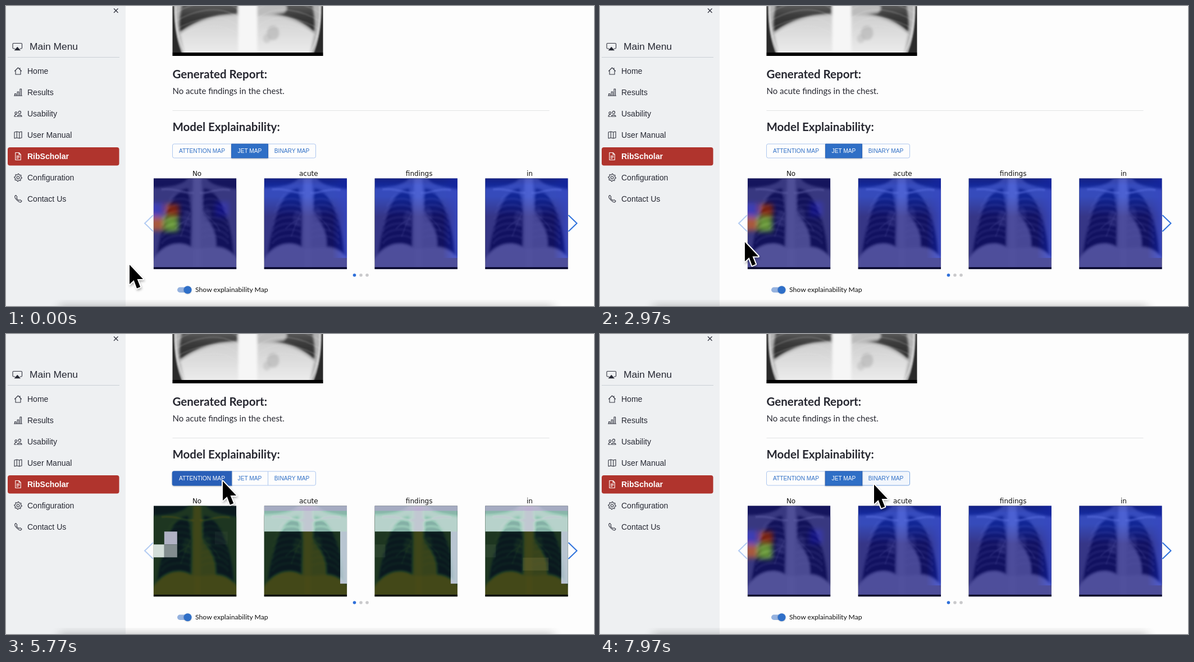
These frames come from a looping animation (1047x535 px, 8000 ms). An HTML page:

```html
<!DOCTYPE html>
<html lang="en">
<head>
<meta charset="utf-8">
<title>Chest report viewer</title>
<style>
  html, body { margin: 0; width: 100%; height: 100%; overflow: hidden; background: #fdfdfd; }
  svg { display: block; width: 1047px; height: 535px; }
  .menu { font: 14px "Liberation Sans", Arial, sans-serif; fill: #262833; }
  .menu .head { font-size: 17.4px; }
  .menu .on { font-weight: 700; fill: #fff; }
  .icon { fill: none; stroke: #31333f; stroke-width: 1.1; stroke-linejoin: round; stroke-linecap: round; }
  .title { font: 700 20.5px Lato, "Open Sans", sans-serif; fill: #262730; }
  .body { font: 15px Lato, "Open Sans", sans-serif; fill: #262730; }
  .switch { font: 12.2px Lato, "Open Sans", sans-serif; fill: #111; }
  .word { font: 12px "DejaVu Sans", sans-serif; fill: #111; text-anchor: middle; }
  .tab { font: 10.2px "Liberation Sans", Arial, sans-serif; text-anchor: middle; }
</style>
</head>
<body>
<svg id="stage" viewBox="0 0 1047 535" xmlns="http://www.w3.org/2000/svg"></svg>
<script>
const stage = document.getElementById('stage');
const LOOP = 8000, PICK_ATTENTION = 4930, PICK_JET = 7080, FADE = 250;
const W = 147.5, H = 162;
const range = n => [...Array(n).keys()];
const line = (d, extra = '') => `<path d="${d}" ${extra}/>`;
const box = (x, y, w, h, fill, extra = '') =>
  `<rect x="${x}" y="${y}" width="${w}" height="${h}" fill="${fill}" ${extra}/>`;

// Sidebar
const icons = [
  'M-6 0 L0 -6 L6 0 M-4.5 -1.5 V6 H4.5 V-1.5 M3.4 -5.5 V-3',
  'M-6 6 V2.5 H-3.5 V6 Z M-1.3 6 V-1 H1.3 V6 Z M3.5 6 V-6 H6 V6 Z M-7 6 H7',
  'M-1.2 5 C-1.2 1.5 6.6 1.5 6.6 5 Z M-3 5 H-6.6 C-6.6 2.6 -5 1.4 -3 1.5 M5 -2.3 A2.3 2.3 0 1 1 .4 -2.3 A2.3 2.3 0 1 1 5 -2.3 M-1.8 -1.2 A1.9 1.9 0 1 1 -5.6 -1.2 A1.9 1.9 0 1 1 -1.8 -1.2',
  'M-6.5 -5 L-2.2 -6 L2.2 -5 L6.5 -6 V5 L2.2 6 L-2.2 5 L-6.5 6 Z M-2.2 -6 V5 M2.2 -5 V6',
  'M-4.7 -6.5 H1.5 L4.7 -3.3 V6.5 H-4.7 Z M1.5 -6.5 V-3.3 H4.7 M-2.3 -.8 H2.3 M-2.3 1.4 H2.3 M-2.3 3.6 H.5',
  '',
  'M-5.5 -5.2 L-3.8 -6.5 L-1.6 -3.5 L-2.6 -1.9 C-2 .2 -.2 2 1.9 2.6 L3.5 1.6 L6.5 3.8 L5.2 5.5 C2.5 8 -7.5 -1.5 -5.5 -5.2 Z'
];
const gear = 'M' + range(32).map(i => {
  const a = i * Math.PI / 16, r = i % 4 < 2 ? 6.7 : 5.1;
  return `${(r * Math.cos(a)).toFixed(1)} ${(r * Math.sin(a)).toFixed(1)}`;
}).join('L') + 'Z M2.3 0 A2.3 2.3 0 1 1 -2.3 0 A2.3 2.3 0 1 1 2.3 0';
icons[5] = gear;

const items = ['Home', 'Results', 'Usability', 'User Manual', 'RibScholar', 'Configuration', 'Contact Us'];
const sidebar = `<g class="menu">
  ${box(0, 0, 213, 535, '#eef0f2')}
  ${line('M192 4.5 l7.5 7.5 m0 -7.5 l-7.5 7.5', 'stroke="#31333f" stroke-width="1.3"')}
  ${line('M16 76 H13.5 Q12 76 12 74.5 V68 Q12 66.5 13.5 66.5 H27 Q28.5 66.5 28.5 68 V74.5 Q28.5 76 27 76 H25', 'class="icon"')}
  ${line('M20.3 72.8 L26 79.3 H14.6 Z')}
  <text class="head" x="42" y="78.4">Main Menu</text>
  ${box(3, 91, 199, 1, '#c9d0d5')}
  ${box(3, 252, 198.5, 32.5, '#b0342d', 'rx="4"')}
  ${items.map((name, i) => {
    const y = 116 + 38 * i, on = i === 4;
    return line(icons[i], `class="icon" transform="translate(21.5 ${y})" ${on ? 'style="stroke:#fff"' : ''}`) +
      `<text x="38" y="${y + 5.2}" ${on ? 'class="on"' : ''}>${name}</text>`;
  }).join('')}
</g>`;

// Chest picture in grey, tinted later for each kind of map
const ribs = range(8).map(i => {
  const y = 32 + i * 11, out = 14 + 14 * Math.exp(-i / 1.6);
  return `M66 ${y - 2} C52 ${y - 10} ${out + 8} ${y - 8} ${out} ${y + 8}` +
    `M84 ${y - 2} C98 ${y - 10} ${W - out - 8} ${y - 8} ${W - out} ${y + 8}`;
}).join('');
const chest = `<g id="chest">
  ${box(0, 0, W, H, '#2c2c2c')}
  <g filter="url(#soft2)">
    ${line('M-5 17 C28 16 56 13 64 -5 H92 C98 13 122 15 153 20 V170 H-5 Z', 'fill="#767676"')}
    ${line('M62 18 C43 17 29 40 20 70 C13 95 8 118 6 140 C22 119 50 110 70 124 L68 62 Z', 'fill="#252525"')}
    ${line('M89 18 C106 17 121 36 130 66 C138 92 142 112 143 138 C130 122 112 118 90 123 L86 60 Z', 'fill="#252525"')}
    ${line('M70 0 H85 L88 60 C98 78 113 91 111 124 L67 128 L68 66 Z', 'fill="#9c9c9c"')}
    ${line('M-5 154 C10 118 46 108 68 124 C90 130 128 108 153 150 V170 H-5 Z', 'fill="#aaa"')}
    ${line('M72 0 H84 V160 H72 Z', 'fill="#bbb" opacity=".3"')}
    <ellipse cx="94" cy="66" rx="8" ry="14" fill="#888" opacity=".4"/>
    <ellipse cx="60" cy="72" rx="8" ry="14" fill="#888" opacity=".4"/>
  </g>
  <g fill="none" filter="url(#soft1)">
    ${line(ribs, 'stroke="#aaa" stroke-width="4.5" opacity=".17"')}
    ${line('M72 26 C54 27 38 17 14 20 M82 26 C100 27 112 17 136 21', 'stroke="#ccc" stroke-width="4" opacity=".4"')}
    ${line('M66 62 C56 78 54 90 48 104 M64 72 C54 76 44 84 38 90 M90 62 C102 74 112 80 118 94', 'stroke="#aaa" stroke-width="2" opacity=".3"')}
  </g>
</g>`;
const floor = fill => box(0, H - 3.5, W, 3.5, fill);

const table = (id, r, g, b) => `<filter id="${id}" x="0" y="0" width="1" height="1" color-interpolation-filters="sRGB">
  <feComponentTransfer><feFuncR type="table" tableValues="${r}"/><feFuncG type="table" tableValues="${g}"/>
  <feFuncB type="table" tableValues="${b}"/></feComponentTransfer></filter>`;
const blur = (id, s) => `<filter id="${id}" x="-50%" y="-50%" width="200%" height="200%"><feGaussianBlur stdDeviation="${s}"/></filter>`;

const defs = `<defs>
  ${blur('soft1', .8)}${blur('soft2', 2)}${blur('soft5', 5)}${blur('soft9', 9)}
  ${table('dim', '.03 .05 .13 .33 .4', '.05 .13 .23 .31 .36', '.1 .13 .13 .08 .1')}
  ${table('lit', '.4 .6 .74 .77 .8', '.55 .79 .83 .75 .8', '.55 .72 .81 .83 .88')}
  <clipPath id="frame">${box(0, 0, W, H, '#000')}</clipPath>
  <clipPath id="scan">${box(0, 0, 268, 89, '#000')}</clipPath>
  <clipPath id="hot"><path d="M0 0 H${W} V139 H135.5 V46 H0 Z"/></clipPath>
  <linearGradient id="top" x2="0" y2="1"><stop stop-color="#0018d0"/><stop offset=".08" stop-color="#0028fa"/>
    <stop offset=".2" stop-color="#0028f4"/>
    <stop offset=".42" stop-color="#000096"/><stop offset="1" stop-color="#00008c"/></linearGradient>
  <linearGradient id="side"><stop offset=".82" stop-color="#0020ff" stop-opacity="0"/>
    <stop offset="1" stop-color="#0020ff" stop-opacity=".9"/></linearGradient>
  <linearGradient id="lung" x2="0" y2="1"><stop stop-color="#747474"/><stop offset=".55" stop-color="#3a3a3a"/>
    <stop offset="1" stop-color="#2a2a2a"/></linearGradient>
  <linearGradient id="belly" x2="0" y2="1"><stop stop-color="#cfcfcf"/><stop offset="1" stop-color="#efefef"/></linearGradient>
  ${chest}
</defs>`;

const jetMap = i => `<g clip-path="url(#frame)"><use href="#chest"/>` + (i
  ? `<g opacity=".54">${box(0, 0, W, H, 'url(#top)')}${box(0, 0, W, 142, 'url(#side)')}</g>`
  : `<g opacity=".52">${box(0, 0, W, H, '#00008a')}
     <g filter="url(#soft5)">${box(-8, 44, 24, 24, '#1010f0')}${box(110, 42, 24, 26, '#0000d0')}
     ${box(21, 46, 24, 23, '#c82000')}${box(-6, 69, 24, 24, '#d84010')}${box(19, 69, 25, 26, '#90f040')}
     ${box(23, 74, 17, 16, '#a8ff50')}</g></g>`) + `${floor('#06062c')}</g>`;

const attentionMap = i => `<g clip-path="url(#frame)"><use href="#chest" filter="url(#dim)"/>` + (i
  ? `<g clip-path="url(#hot)"><use href="#chest" filter="url(#lit)"/></g>` +
    box(0, 0, W, 9, '#b8a4d0', 'opacity=".6"') +
    box(135.5, 46, 12, 93, '#b9bfd4', 'opacity=".65"') +
    (i > 1 ? box(0, 69, 19, 23, '#a0b090', 'opacity=".1"') : '') +
    (i === 3 ? box(67, 92.5, 46, 23, '#a09050', 'opacity=".2"') : '')
  : box(19, 46, 23, 23, '#b0b2c4') + box(0, 69, 19, 23, '#d3ded9') +
    box(19, 69, 23, 23, '#828d8f') + box(109, 46, 23, 23, '#809080', 'opacity=".08"')) +
  `${floor('#060b10')}</g>`;

const words = ['No', 'acute', 'findings', 'in'];
const slotX = i => 262.8 + 196.8 * i;
const row = draw => words.map((_, i) => `<g transform="translate(${slotX(i)} 307.3)">${draw(i)}</g>`).join('');

const scanRibs = range(5).map(i => `M4 ${i * 15 - 2} C45 ${i * 15 - 26} 90 ${i * 14 - 30} 118 ${i * 15 - 8}` +
  `M264 ${i * 15 - 2} C225 ${i * 15 - 26} 180 ${i * 14 - 30} 152 ${i * 15 - 8}`).join('');
const scan = `<g transform="translate(296.5 0)" clip-path="url(#scan)">
  ${box(0, 0, 268, 89, '#b4b4b4')}
  <g filter="url(#soft2)">
    ${line('M14 50 C44 27 80 16 117 17 H156 C196 14 230 30 252 50 L244 92 H22 Z', 'fill="url(#belly)"')}
    ${line('M20 -16 H116 V14 C82 14 46 22 14 46 C10 32 14 10 20 -16 Z', 'fill="url(#lung)"')}
    ${line('M160 -16 H246 C252 12 255 32 252 46 C232 26 200 13 164 14 Z', 'fill="url(#lung)"')}
    ${line('M148 -6 H196 C206 0 206 6 198 12 L150 18 Z', 'fill="#bcbcbc"')}
    ${line('M117 -6 H151 V90 H117 Z', 'fill="#f6f6f6"')}
    <ellipse cx="179" cy="48" rx="11" ry="13" fill="#a8a8a8" opacity=".5"/>
    <ellipse cx="168" cy="58" rx="7" ry="8" fill="#b4b4b4" opacity=".45"/>
  </g>
  ${line(scanRibs, 'fill="none" stroke="#e8e8e8" stroke-width="3" opacity=".14" filter="url(#soft1)"')}
  ${line('M-2 0 H2.5 C3 36 7 64 19 90 H-2 Z M270 0 H265.5 C265 36 261 64 249 90 H270 Z', 'fill="#2a2a2a" filter="url(#soft1)"')}
  ${line('M6 0 C5 34 10 62 23 84 M262 0 C263 34 258 62 245 84', 'fill="none" stroke="#e8e8e8" stroke-width="2.5" opacity=".6" filter="url(#soft1)"')}
  ${box(0, 83, 268, 6, '#000')}
</g>`;

const tabs = [
  { name: 'ATTENTION MAP', x: 296.5, w: 105 },
  { name: 'JET MAP', x: 401.5, w: 65 },
  { name: 'BINARY MAP', x: 466.5, w: 85 }
];
const tabParts = tabs.map(({ name, x, w }, i) => `<g class="part">
  ${line(i === 0 ? `M${x + w} 246 H${x + 3} q-3 0 -3 3 V268 q0 3 3 3 H${x + w} Z`
    : i === 2 ? `M${x} 246 H${x + w - 3} q3 0 3 3 V268 q0 3 -3 3 H${x} Z`
    : `M${x} 246 H${x + w} V271 H${x} Z`)}
  <text class="tab" x="${x + w / 2}" y="262.1">${name}</text></g>`).join('');

const content = `<g id="content">
  ${scan}
  <text class="title" x="296.5" y="129">Generated Report:</text>
  <text class="body" x="296.5" y="156.5">No acute findings in the chest.</text>
  ${box(296.5, 186, 671, 1, '#e2e3e4')}
  <text class="title" x="296.5" y="222.5">Model Explainability:</text>
  <g id="tabs">${tabParts}</g>
  ${words.map((word, i) => `<text class="word" x="${slotX(i) + W / 2 + (i ? 5.5 : 3.5)}" y="303.3">${word}</text>`).join('')}
  <g id="jet">${row(jetMap)}</g><g id="attention">${row(attentionMap)}</g>
  <g fill="none" stroke-width="2">${line('M262 373 L247 387.5 L262 402', 'stroke="#b3ccf3"')}
  ${line('M1001.5 373 L1016.5 387.5 L1001.5 402', 'stroke="#2f72dc"')}</g>
  ${[620.5, 632, 643].map((x, i) => `<circle cx="${x}" cy="480" r="2.8" fill="${i ? '#c9c9cb' : '#2e6fd9'}"/>`).join('')}
  ${box(305, 501.5, 24, 9.5, '#95b2df', 'rx="4.7"')}
  <circle cx="323.5" cy="507" r="7" fill="#000" opacity=".2" filter="url(#soft1)"/>
  <circle cx="323.5" cy="506.2" r="7" fill="#2f6fc8"/>
  <text class="switch" x="337" y="509.5">Show explainability Map</text>
</g>`;

const arrow = 'M0 .5 V35 L7.6 28 L13 42.5 L19.2 40 L13.6 26 H24 Z';
const pointer = `<g id="pointer">
  ${line(arrow, 'transform="translate(1.5 3)" opacity=".35" stroke="#000" stroke-width="2" filter="url(#soft2)"')}
  ${line(arrow, 'fill="#000" stroke="#fff" stroke-width="4" paint-order="stroke" stroke-linejoin="round"')}
</g>`;

stage.innerHTML = defs + box(0, 0, 1047, 535, '#fdfdfd') + sidebar + content +
  box(95, 536, 880, 24, '#000', 'opacity=".3" filter="url(#soft9)"') + pointer;

// Motion
const path = [
  [0, 220, 461], [2100, 230, 471], [2650, 230, 471], [3650, 345, 263], [4200, 345, 263],
  [5030, 345, 261], [5250, 345, 261], [5770, 386, 262], [6600, 422, 257], [7250, 422, 257],
  [7900, 488, 268], [LOOP, 488, 268]
];
const clamp = v => Math.min(1, Math.max(0, v));
const smooth = v => v * v * (3 - 2 * v);
const fade = (t, from) => { const v = clamp((t - from) / FADE); return 1 - (1 - v) ** 1.4; };
const mix = (a, b, k) => `rgb(${a.map((v, i) => Math.round(v + (b[i] - v) * k))})`;

function pointerAt(t) {
  const n = path.findIndex(p => p[0] > t), [t0, x0, y0] = path[n - 1], [t1, x1, y1] = path[n];
  const k = smooth((t - t0) / (t1 - t0));
  return [x0 + (x1 - x0) * k, y0 + (y1 - y0) * k];
}

const $ = id => document.getElementById(id);
const parts = [...document.querySelectorAll('.part')];
const shapes = parts.map(g => [g.querySelector('path'), g.querySelector('text')]);
const white = [253, 253, 253], hoverWhite = [242, 246, 252], blue = [47, 111, 198], deepBlue = [41, 95, 184];

function render(t) {
  const [x, y] = pointerAt(t);
  $('pointer').setAttribute('transform', `translate(${x.toFixed(2)} ${y.toFixed(2)})`);
  const picked = t >= PICK_ATTENTION, showAttention = picked && t < PICK_JET;
  $('content').setAttribute('transform', `translate(0 ${picked ? -1 : 0})`);
  $('attention').style.display = showAttention ? '' : 'none';
  $('jet').style.display = showAttention ? 'none' : '';
  const level = fade(t, PICK_ATTENTION) - fade(t, PICK_JET);
  const current = showAttention ? 0 : 1;
  [level, 1 - level, 0].forEach((k, i) => {
    const [shape, label] = shapes[i], tab = tabs[i], active = i === current;
    const over = x >= tab.x && x < tab.x + tab.w && y > 245 && y < 272;
    shape.setAttribute('fill', mix(over ? hoverWhite : white, over ? deepBlue : blue, k));
    shape.setAttribute('stroke', active ? '#2b63b8' : over ? '#78a5e2' : '#adc7ef');
    shape.setAttribute('stroke-width', active && picked ? 1.6 : 1);
    shape.style.filter = active ? 'drop-shadow(0 1px 1px rgba(0,0,0,.25))' : 'none';
    label.setAttribute('fill', mix(blue, [255, 255, 255], k));
  });
  // The selected tab overlaps its neighbours' borders
  if ($('tabs').lastElementChild !== parts[current]) $('tabs').append(parts[current]);
}

const start = performance.now();
function tick() {
  render((performance.now() - start) % LOOP);
  requestAnimationFrame(tick);
}
tick();
</script>
</body>
</html>
```
